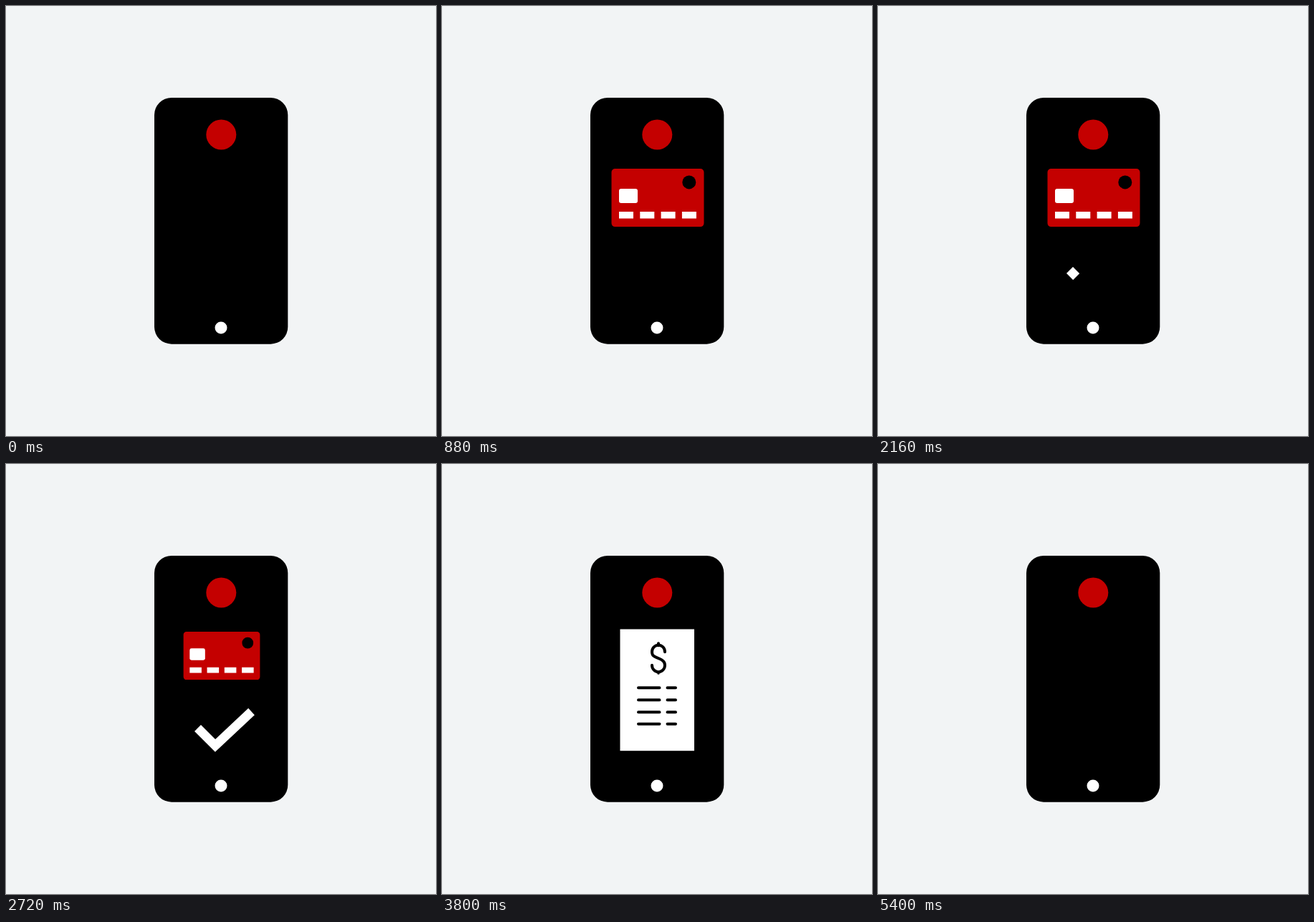
Write an HTML page that moves like this. It is 600 px wide and 600 px high and loops after 5720 ms.

```html
<!DOCTYPE html>
<html lang="en">
<head>
<meta charset="utf-8">
<title>Pay by phone</title>
<style>
  html, body { margin: 0; width: 100%; height: 100%; overflow: hidden; background: #f2f4f5; }
  svg { position: absolute; left: 0; top: 0; display: block; }
</style>
</head>
<body>
<svg width="600" height="600" viewBox="0 0 600 600">
  <clipPath id="slot"><rect x="240" y="230.5" width="120" height="180"/></clipPath>
  <rect x="207" y="128" width="186.3" height="343.7" rx="24"/>
  <circle cx="300.3" cy="179.5" r="21" fill="#c40000"/>
  <circle cx="300" cy="449" r="8.5" fill="#fff"/>
  <path id="check" d="M267.5 368.5L292 393L342.5 345.5" pathLength="1" fill="none"
        stroke="#fff" stroke-width="12.7"/>
  <g clip-path="url(#slot)">
    <g id="bill" fill="none" stroke="#000" stroke-width="4" stroke-linecap="round">
      <rect x="248.5" y="225" width="103.5" height="177" fill="#fff" stroke="none"/>
      <path d="M311 264A9 9.5 0 0 0 293 264C293 270 297 271 302 273S311 277 311 282.5A9 9.5 0 0 1 293 282.5
               M302 252v3M302 292v1.5"/>
      <path d="M274 314h29.5M314.5 314h11.5M274 331h29.5M314.5 331h11.5
               M274 348h29.5M314.5 348h11.5M274 364.5h29.5M314.5 364.5h11.5"/>
    </g>
  </g>
  <g id="card">
    <path id="plate" fill="#c40000" stroke="#c40000" stroke-width="10" stroke-linejoin="round"/>
    <circle cx="43.8" cy="-21.7" r="9.5"/>
    <rect x="-54" y="-12.6" width="26" height="20" rx="3" fill="#fff"/>
    <path d="M-54 24.2H54" stroke="#fff" stroke-width="9.5" stroke-dasharray="20 9.3"/>
  </g>
  <path id="sparks" fill="none" stroke="#000" stroke-width="7" stroke-linecap="round"/>
</svg>
<script>
const LOOP = 5720, STEP = 40;
const [card, plate, check, bill, sparks] =
  ['card', 'plate', 'check', 'bill', 'sparks'].map(id => document.getElementById(id));

const span = (t, from, to) => Math.min(1, Math.max(0, (t - from) / (to - from)));
const easeOut = (p, n) => 1 - (1 - p) ** n;
const easeInOut = p => p < 0.5 ? 2 * p * p : 1 - 2 * (1 - p) ** 2;
const easeBack = p => 1 + 2.9 * (p - 1) ** 3 + 1.9 * (p - 1) ** 2;

// Smooth value through [time, value] keys.
function keyed(t, keys) {
  let value = keys[0][1];
  for (let i = 1; i < keys.length; i++) {
    const p = span(t, keys[i - 1][0], keys[i][0]);
    value += (keys[i][1] - keys[i - 1][1]) * easeInOut(p);
  }
  return value;
}

function drawCard(t) {
  const enter = span(t, 200, 800);
  const size = easeBack(enter) * (1 - easeInOut(span(t, 2560, 3105)));
  const rise = 100 * (1 - easeOut(enter, 3));
  const swing = keyed(t, [[1360, 0], [1510, -0.7], [1690, 1], [1920, 0]]);
  const scale = size * (1 + 0.11 * Math.abs(swing));
  card.style.visibility = scale > 0.002 ? 'visible' : 'hidden';
  card.setAttribute('transform',
    `translate(${301 + 8.5 * swing} ${267.6 + rise}) rotate(${6.6 * swing}) scale(${scale})`);
  // The plate tapers towards the side it swings to.
  plate.setAttribute('d', `M${-59.5 + 2 * swing} ${-35.5 - 3 * swing}L59.5 ${-35.5 + 4 * swing}` +
    `V${35.5 - 1.5 * swing}L-59.5 ${35.5 + swing}Z`);
}

function drawSparks(t) {
  const start = [400, 1440, 2200].find(s => t > s && t < s + 480);
  let d = '';
  if (start !== undefined) {
    const p = span(t, start, start + 480);
    const tail = 28 + 33.5 * p * p, head = 28 + 33.5 * easeOut(p, 2);
    for (const [degrees, shift] of [[0, 0], [31.7, 1], [60.5, 2.5], [90, 3.5]]) {
      const angle = degrees * Math.PI / 180;
      const at = r => `${371 + (r + shift) * Math.cos(angle)} ${146.5 - (r + shift) * Math.sin(angle)}`;
      d += `M${at(tail)}L${at(head)}`;
    }
  }
  sparks.setAttribute('d', d);
}

function drawCheck(t) {
  const drawn = easeInOut(span(t, 2040, 2520)), erased = easeInOut(span(t, 2740, 3120));
  check.style.visibility = drawn > erased ? 'visible' : 'hidden';
  check.setAttribute('stroke-dasharray', `${drawn - erased} 2`);
  check.setAttribute('stroke-dashoffset', -erased);
}

function drawBill(t) {
  const shown = easeOut(span(t, 3160, 4120), 4.15) - span(t, 4800, 5400) ** 3;
  bill.style.visibility = shown > 0 ? 'visible' : 'hidden';
  bill.setAttribute('transform', `translate(0 ${-172 * (1 - shown)})`);
}

const begin = performance.now();
function frame() {
  const elapsed = (performance.now() - begin) % LOOP;
  const t = Math.floor(elapsed / STEP) * STEP;
  drawCard(t);
  drawSparks(t);
  drawCheck(t);
  drawBill(t);
  requestAnimationFrame(frame);
}
frame();
</script>
</body>
</html>
```
